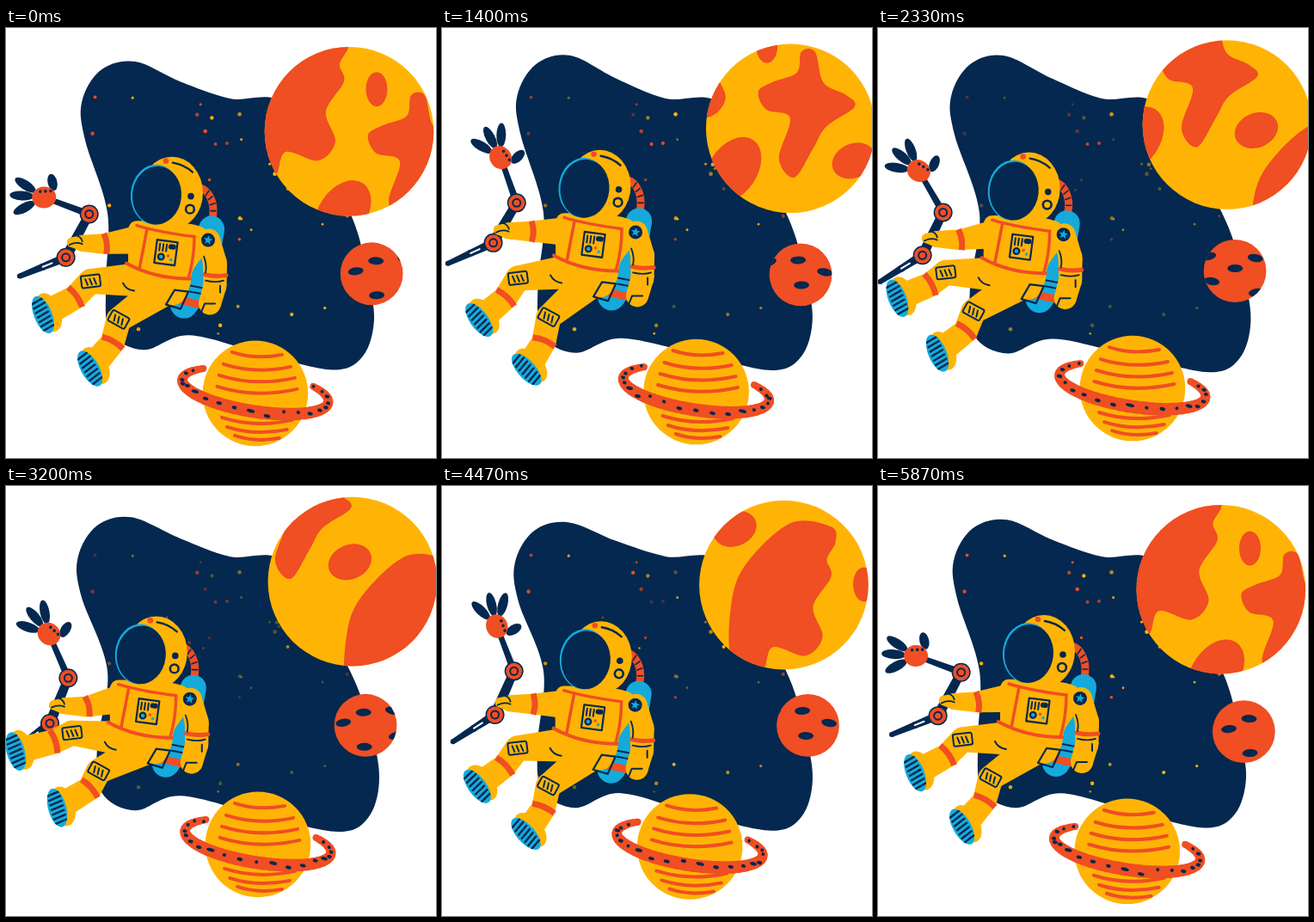
Recreate the animation shown at these times as an HTML page with a canvas. Size 500 by 500 pixels, loop 5.91 s.

```html
<!DOCTYPE html>
<html lang="en">
<head>
<meta charset="utf-8">
<title>Astronaut among planets</title>
<style>
html, body { margin: 0; height: 100%; overflow: hidden; background: #fff; }
canvas { display: block; width: 500px; height: 500px; }
</style>
</head>
<body>
<canvas id="stage" width="500" height="500"></canvas>
<script>
const c = document.getElementById('stage').getContext('2d');
const LOOP = 5910, TURN = Math.PI * 2, DEG = TURN / 360;
const YELLOW = '#ffb405', RED = '#f04e23', NAVY = '#04284f', BLUE = '#15aadb';

let turn = 0; // progress through the loop, 0 to 1

// Every part drifts on sines of the loop; peaks are in degrees of the loop
const wave = (peak, times = 1) => Math.cos(times * (turn * TURN - peak * DEG));
const sway = (mean, size, peak, size2 = 0, peak2 = 90) => mean + size * wave(peak) + size2 * wave(peak2, 2);
const hash = i => { const h = Math.sin(i * 127.1 + 4) * 43758.5; return h - Math.floor(h); };
const polar = ([x, y], r, deg) => [x + r * Math.cos(deg * DEG), y + r * Math.sin(deg * DEG)];
const between = ([ax, ay], [bx, by], u, v = u) => [ax + (bx - ax) * u, ay + (by - ay) * v];

function fill(color) { c.fillStyle = color; c.fill(); }
function stroke(color, width) { c.strokeStyle = color; c.lineWidth = width; c.stroke(); }

// Smooth closed outline through flat x, y points
function outline(...p) {
  const n = p.length / 2;
  const at = i => [p[(i + n) % n * 2], p[(i + n) % n * 2 + 1]];
  c.beginPath();
  c.moveTo(p[0], p[1]);
  for (let i = 0; i < n; i++) {
    const [a, b, d, e] = [at(i - 1), at(i), at(i + 1), at(i + 2)];
    c.bezierCurveTo(b[0] + (d[0] - a[0]) / 6, b[1] + (d[1] - a[1]) / 6,
      d[0] - (e[0] - b[0]) / 6, d[1] - (e[1] - b[1]) / 6, d[0], d[1]);
  }
}
function shape(color, ...p) { outline(...p); fill(color); }
function line(color, width, ...p) {
  c.beginPath();
  for (let i = 0; i < p.length; i += 2) c.lineTo(p[i], p[i + 1]);
  stroke(color, width);
}
function bow(color, width, x0, y0, cx, cy, x1, y1) {
  c.beginPath();
  c.moveTo(x0, y0);
  c.quadraticCurveTo(cx, cy, x1, y1);
  stroke(color, width);
}
function oval(color, x, y, rx, ry = rx, tilt = 0) {
  c.beginPath();
  c.ellipse(x, y, rx, ry, tilt, 0, TURN);
  fill(color);
}
function placed(x, y, angle, draw) {
  c.save();
  c.translate(x, y);
  c.rotate(angle);
  draw();
  c.restore();
}
// Tapered limb through [x, y, radius] stations
function limb(color, ...stations) {
  stations.forEach(([x, y, r], i) => {
    oval(color, x, y, r);
    if (!i) return;
    const [px, py, pr] = stations[i - 1], a = Math.atan2(y - py, x - px);
    const nx = -Math.sin(a), ny = Math.cos(a);
    c.beginPath();
    c.moveTo(px + nx * pr, py + ny * pr);
    c.lineTo(x + nx * r, y + ny * r);
    c.lineTo(x - nx * r, y - ny * r);
    c.lineTo(px - nx * pr, py - ny * pr);
    fill(color);
  });
}
function band([x, y], from, to, half) {
  placed(x, y, Math.atan2(to[1] - from[1], to[0] - from[0]), () => {
    c.lineCap = 'butt';
    bow(RED, 7, 0, -half, 4, 0, 0, half);
  });
}

function drawSpace() {
  const tx = sway(-2, 2.5, 30), ty = sway(-1, 5.5, 292);
  const rx = sway(3, -3, 0), ry = sway(1.5, 2.5, 213);
  const lx = sway(-5, 5, 0), ly = sway(2, 2.5, 134);
  outline(118, 215, 92 + tx, 130 + ty, 88 + tx, 85 + ty, 110 + tx, 48 + ty, 150 + tx, 38 + ty,
    203, 62 + ty / 2, 260, 82, 330, 92, 400, 215, 420 + rx, 290, 428 + rx, 340 + ry, 415 + rx, 382 + ry,
    380 + rx, 398 + ry, 300, 380 + ry, 213 + lx, 357 + ly, 160 + lx, 374 + ly, 121 + lx, 353 + ly, 116 + lx, 300);
  fill(NAVY);
  c.save();
  c.clip();
  for (let i = 0; i < 60; i++) {
    c.globalAlpha = .64 + .36 * wave((hash(i) - .5) * 160);
    oval(hash(i + 50) < .64 ? YELLOW : RED, 95 + 330 * hash(i + 200), 55 + 315 * hash(i + 300), 1.2 + 1.2 * hash(i + 90));
  }
  c.restore();
}

function globe(color, x, y, r, draw) {
  c.save();
  c.translate(x, y);
  oval(color, 0, 0, r);
  c.clip();
  draw();
  c.restore();
}

function drawContinents() {
  shape(RED, 278,160, 276,100, 292,50, 345,0, 393,4, 398,22, 388,42, 393,62, 372,97, 383,132, 363,154,
    325,144, 312,172);
  shape(RED, 471,78, 466,102, 438,113, 421,124, 430,145, 458,155, 445,202, 463,224, 485,190, 500,165,
    533,142, 523,128, 497,114, 487,78);
  oval(RED, 431, 71, 12.5, 20);
  oval(RED, 532, 204.5, 26, 20, -.4);
  oval(RED, 391.5, 215, 28, 42, .6);
}

function drawPlanets() {
  globe(YELLOW, sway(401.5, 4.7, 122), sway(115.7, 4.6, 9), 98.3, () => {
    for (const lap of [0, 1])
      placed((lap - turn) * 251 - 399, (lap - turn) * 198 - 120, 0, drawContinents);
  });
  globe(RED, sway(421, -6, 134), sway(282.5, 5.3, 52), 36.4, () => {
    for (let lap = -1; lap < 4; lap++) {
      const x = lap * 88.5 - turn * 177;
      for (const [dx, y] of [[6, 25], [43, 12], [70, -3], [5, -15], [39, -17]])
        oval(NAVY, x + dx, y, 9, 4.5, Math.sign(y) * (x + dx) / -150);
    }
  });
}

function drawRinged() {
  const x = sway(292, 4.3, 119), y = sway(421, 4.2, 24);
  globe(YELLOW, x, y, 61.3, () => {
    for (const h of [-47, -33, -20, -7, 29, 40, 50]) {
      const half = Math.sqrt(3600 - h * h) * .78;
      bow(RED, 4, 2 - half, h - 1, 0, h + half * .28, 2 + half, h + 2);
    }
  });
  // The ring is an open arc of a tilted ellipse, running in front of the globe
  placed(x, y - 3, 9 * DEG, () => {
    const at = u => { const a = (222 - 262 * u) * DEG; return [86 * Math.cos(a), 24 * Math.sin(a)]; };
    const girth = u => 4 + 3.5 * Math.sin(u * Math.PI);
    limb(RED, ...Array.from({ length: 41 }, (_, i) => [...at(i / 40), girth(i / 40)]));
    for (let i = 0; i < 20; i++) {
      const u = (i / 20 + 1 - turn) % 1, [dx, dy] = at(u);
      oval(NAVY, dx, dy + girth(u) * (hash(i + 7) - .5), 1.8 + 3.5 * hash(i) * Math.sin(u * Math.PI), 2, .1);
    }
  });
}

function pose() {
  const p = {
    body: [sway(-10.8, 10.8, 0), sway(-1, 8.7, 274)],
    head: [sway(-9.4, 9.4, 355), sway(-.5, 7.8, 271)],
    cuff: [sway(104.5, 10.8, 354), sway(249, 8.7, 257, 3.9, 0)],
    low: [sway(60, 9.7, 353), sway(264.5, 9, 243, 6.4, 0)],
    high: [sway(84.5, 12.3, 6), sway(214.5, 6.7, 243, 5, 0)],
    knee1: [sway(87.5, 11, 0), sway(293.5, 8.6, 305, 4)],
    boot1: [sway(35, 16, 4, 7.3, 98), sway(331, 14.9, 340, 12)],
    knee2: [sway(121, 12, 0, 2), sway(338, 8, 308, 4)],
    boot2: [sway(88, 20, 0, 9.5), sway(391.5, 12.6, 342, 8)],
    sole1: sway(63, 4, 180, 9, 0),
    sole2: sway(58.5, 8, 180, 10, 0)
  };
  // The claw hangs upright and swings down once per loop
  const lift = sway(46, 0, 0, 7, 60) - 42.5 * ((1 + wave(0)) / 2) ** 8;
  p.claw = polar(p.high, 56, 200.4 + lift);
  p.grip = lift + sway(6, 8, 285, 9, 85) - 2;
  p.tail = polar(p.low, 58, sway(151, 8, 30));
  p.hand = [p.cuff[0] - 29.5, p.cuff[1] - .8];
  return p;
}

function drawRobotArm(p) {
  limb(NAVY, [...p.tail, 3], [...between(p.tail, p.low, .5), 4], [...p.low, 5]);
  line('#fff', 2, ...between(p.low, p.tail, .3), ...between(p.low, p.tail, .5));
  limb(NAVY, [...p.low, 6], [...p.high, 5]);
  limb(NAVY, [...p.high, 4], [...p.claw, 3]);
  for (const joint of [p.low, p.high])
    [11, 9.5, 5.5, 3.5].forEach((r, i) => oval(i % 2 ? RED : NAVY, ...joint, r));
  placed(...p.claw, p.grip * DEG, () => {
    for (const deg of [155, 187, 216, 302]) {
      const [x, y] = polar([0, 0], deg > 300 ? 20 : 26, deg);
      oval(NAVY, x, y, deg > 300 ? 10 : 14, 5.5, (deg > 300 ? 260 : deg) * DEG);
    }
    oval(RED, 0, 0, 14, 12.5);
    for (const x of [-4, 2, 8]) oval(NAVY, x, -7, 1.8);
  });
}

function drawLeg(hip, knee, boot, sole, reach, tilt) {
  const shin = between(knee, boot, reach, .48);
  limb(YELLOW, [...hip, 20], [...knee, 14.5], [...shin, 14], [...between(boot, shin, .3), 15]);
  band(shin, boot, knee, 14);
  placed(...knee, tilt, () => {
    c.beginPath();
    c.roundRect(-11, -7, 22, 14, 2);
    stroke(NAVY, 2);
    for (const x of [-5, 0, 5]) line(NAVY, 2, x - 1, -3, x + 1, 4);
  });
  placed(...boot, sole * DEG, () => {
    oval(YELLOW, 0, -6, 23.5, 14);
    oval(BLUE, 0, 1, 23, 10.5);
    c.clip();
    for (let x = -17; x < 20; x += 5.6) line(NAVY, 2.4, x - 1, -6, x + 1, 8);
  });
}

function drawPack() {
  c.beginPath();
  c.ellipse(223, 213, 18, 27, 0, -1.4, 1);
  stroke(RED, 9);
  for (const a of [-.9, -.6, -.3, 0])
    line(NAVY, 1.6, 223 + 15 * Math.cos(a), 213 + 23 * Math.sin(a), 223 + 21 * Math.cos(a), 213 + 30 * Math.sin(a));
  limb(BLUE, [239, 234, 15], [228, 290, 17], [207, 322, 16]);
  line(RED, 9, 199, 316, 230, 323);
  for (const y of [300, 307]) line(NAVY, 2, 214, y, 235, y + 4);
}

function drawTorso() {
  shape(YELLOW, 143,231, 165,225, 228,232, 232,258, 217,283, 213,303, 199,322, 166,317, 137,298, 142,272);
  bow(RED, 3.5, 152, 230, 178, 238, 219, 243);
  line(RED, 3.5, 164, 234, 155, 281);
  bow(RED, 3.5, 219, 243, 219, 268, 212, 292);
  bow(RED, 4, 140, 274, 172, 292, 214, 292);
  placed(186, 261, .13, () => {
    c.strokeStyle = NAVY;
    c.lineWidth = 2.2;
    c.strokeRect(-12, -13, 24, 27);
    for (const x of [-8, -4, 0]) line(NAVY, 2, x, -9, x, -1);
    line(NAVY, 6, 5, -7, 8, -7);
    oval(NAVY, -5, 6, 4.5);
    oval(BLUE, -5, 6, 2.2);
    oval(RED, 3, 4, 1.8);
    oval(BLUE, 7, 8, 1.8);
  });
  line(NAVY, 2.2, 186, 322, 196, 305, 212, 307, 203, 327, 186, 322);
  bow(NAVY, 2, 136, 297, 140, 305, 149, 306);
}

function drawNearArm() {
  limb(YELLOW, [236, 247, 13], [243, 274, 14], [243, 300, 13.5], [237, 321, 13]);
  bow(RED, 5, 231, 287, 243, 290, 256, 288);
  bow(NAVY, 1.8, 232, 294, 244, 297, 253, 294);
  line(NAVY, 2, 249, 300, 249, 308);
  line(NAVY, 2, 227, 331, 231, 321, 243, 321);
  bow(NAVY, 1.8, 230, 266, 234, 276, 232, 285);
  oval(NAVY, 235, 247, 8);
  c.beginPath();
  for (let i = 0; i < 10; i++) c.lineTo(...polar([235, 247], i % 2 ? 2.4 : 5.6, i * 36 - 80));
  fill(BLUE);
}

function drawHelmet() {
  oval(YELLOW, 193, 192, 36, 42);
  oval(BLUE, 173.5, 194, 28.5, 35, .1);
  oval(NAVY, 175.5, 195, 28.5, 34, .1);
  oval(RED, 186, 155, 3.3);
  bow(NAVY, 2.4, 194, 157, 207, 159, 217, 168);
  oval(NAVY, 215, 196, 3.8);
  oval(NAVY, 214, 211, 6.2);
  oval(YELLOW, 214, 211, 3.6);
}

function drawAstronaut() {
  const p = pose(), [bx, by] = p.body, [hx, hy] = p.hand;
  const shoulder = [158 + bx, 246 + by];
  placed(bx, by, 0, drawPack);
  drawRobotArm(p);
  limb(YELLOW, [...shoulder, 17], [...p.cuff, 12], [hx + 2, hy, 9.5], [hx - 9, hy - 1, 6]);
  band(p.cuff, p.cuff, shoulder, 12);
  bow(NAVY, 1.8, hx - 12, hy + 2, hx - 4, hy - 2, hx + 3, hy + 1);
  bow(NAVY, 1.8, hx - 4, hy - 9, hx + 2, hy - 7, hx + 3, hy - 2);
  drawLeg([157 + bx, 293 + by], p.knee1, p.boot1, p.sole1, .33, -.12);
  drawLeg([183 + bx, 304 + by], p.knee2, p.boot2, p.sole2, .22, .5);
  placed(bx, by, 0, () => { drawTorso(); drawNearArm(); });
  placed(...p.head, 0, drawHelmet);
}

const start = performance.now();
function frame() {
  turn = (performance.now() - start) % LOOP / LOOP;
  c.clearRect(0, 0, 500, 500);
  c.lineCap = c.lineJoin = 'round';
  drawSpace();
  drawPlanets();
  drawRinged();
  drawAstronaut();
  requestAnimationFrame(frame);
}
frame();
</script>
</body>
</html>
```
